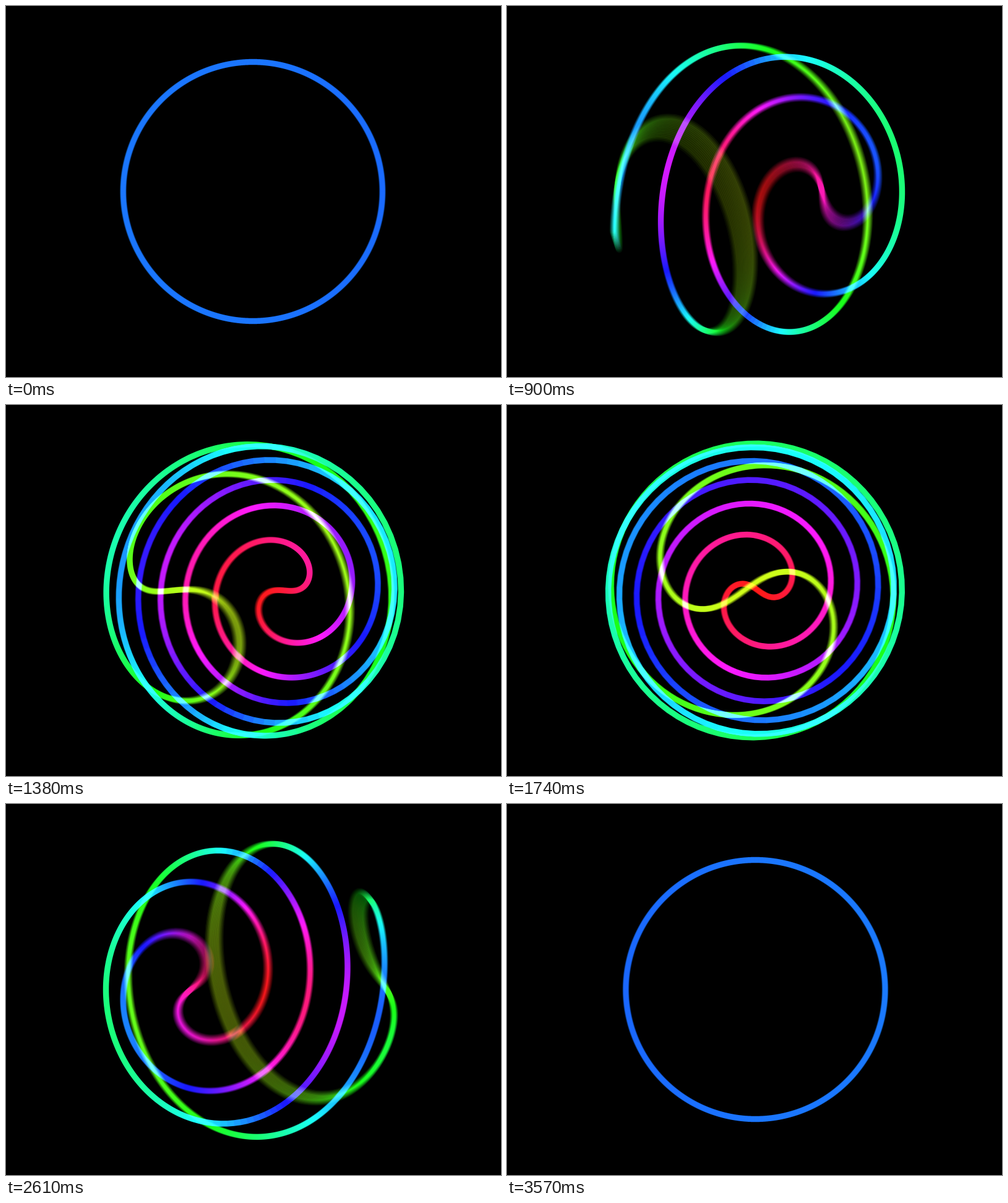
Animation of 800x600 px, one loop 3.6 s. Source, as an HTML page with a canvas:

```html
<!DOCTYPE html>
<html lang="en">
<head>
<meta charset="utf-8">
<title>Twisted ring</title>
<style>
  html, body { margin: 0; width: 100%; height: 100%; overflow: hidden; background: #000; }
  canvas { display: block; width: 800px; height: 600px; }
</style>
</head>
<body>
<canvas id="stage" width="800" height="600"></canvas>
<script>
const W = 800, H = 600;
const STEP_MS = 30, STEPS = 120;
const RADIUS = 209.5, CAMERA = 438, LINE = 9.5;
const MAX_TWIST = 3.7 * Math.PI;
const SEGMENTS = 800, BLUR_SAMPLES = 16, SHUTTER = 0.8;

const makeContext = canvas => {
  canvas.width = W;
  canvas.height = H;
  return canvas.getContext('2d', { alpha: false });
};
const screen = makeContext(document.getElementById('stage'));
const layer = makeContext(document.createElement('canvas'));

const easeCubic = p => p < 0.5 ? 4 * p ** 3 : 1 - 4 * (1 - p) ** 3;

// A great circle twisted around its x axis, then tumbled around the vertical axis.
function ringPoint(phi, twist, tilt) {
  const along = Math.cos(phi), around = Math.sin(phi);
  const y = around * Math.cos(twist * along);
  const depth = around * Math.sin(twist * along);
  const x = along * Math.cos(tilt) + depth * Math.sin(tilt);
  const z = depth * Math.cos(tilt) - along * Math.sin(tilt);
  const scale = RADIUS / (1 - z * RADIUS / CAMERA);
  return { x: W / 2 + x * scale, y: H / 2 - y * scale, z };
}

function drawRing(t) {
  const twist = MAX_TWIST * easeCubic(1 - Math.abs(1 - 2 * t));
  const points = Array.from({ length: SEGMENTS }, (_, i) =>
    ringPoint(i / SEGMENTS * 2 * Math.PI, twist, Math.PI * t));
  const at = i => points[(i + SEGMENTS) % SEGMENTS];

  points.forEach((p, i) => {
    const a = at(i - 1), b = at(i + 1);
    const k = LINE / 2 / (Math.hypot(b.x - a.x, b.y - a.y) || 1);
    p.nx = (a.y - b.y) * k;
    p.ny = (b.x - a.x) * k;
  });

  layer.globalCompositeOperation = 'source-over';
  layer.fillStyle = '#000';
  layer.fillRect(0, 0, W, H);
  layer.globalCompositeOperation = 'lighter';
  points.forEach((p, i) => {
    const q = at(i + 1);
    layer.fillStyle = `hsl(${216 - 72 * (p.z + q.z)}, 100%, 55%)`;
    layer.beginPath();
    layer.moveTo(p.x + p.nx, p.y + p.ny);
    layer.lineTo(q.x + q.nx, q.y + q.ny);
    layer.lineTo(q.x - q.nx, q.y - q.ny);
    layer.lineTo(p.x - p.nx, p.y - p.ny);
    layer.fill();
  });
}

// Running average of several moments gives the motion blur.
function drawStep(step) {
  for (let i = 0; i < BLUR_SAMPLES; i++) {
    drawRing((step + SHUTTER * (i + 0.5) / BLUR_SAMPLES) / STEPS);
    screen.globalAlpha = 1 / (i + 1);
    screen.drawImage(layer.canvas, 0, 0);
  }
}

let shown = -1;
function tick() {
  const step = Math.floor((performance.now() + 0.01) / STEP_MS) % STEPS;
  if (step !== shown) {
    shown = step;
    drawStep(step);
  }
  requestAnimationFrame(tick);
}
tick();
</script>
</body>
</html>
```
